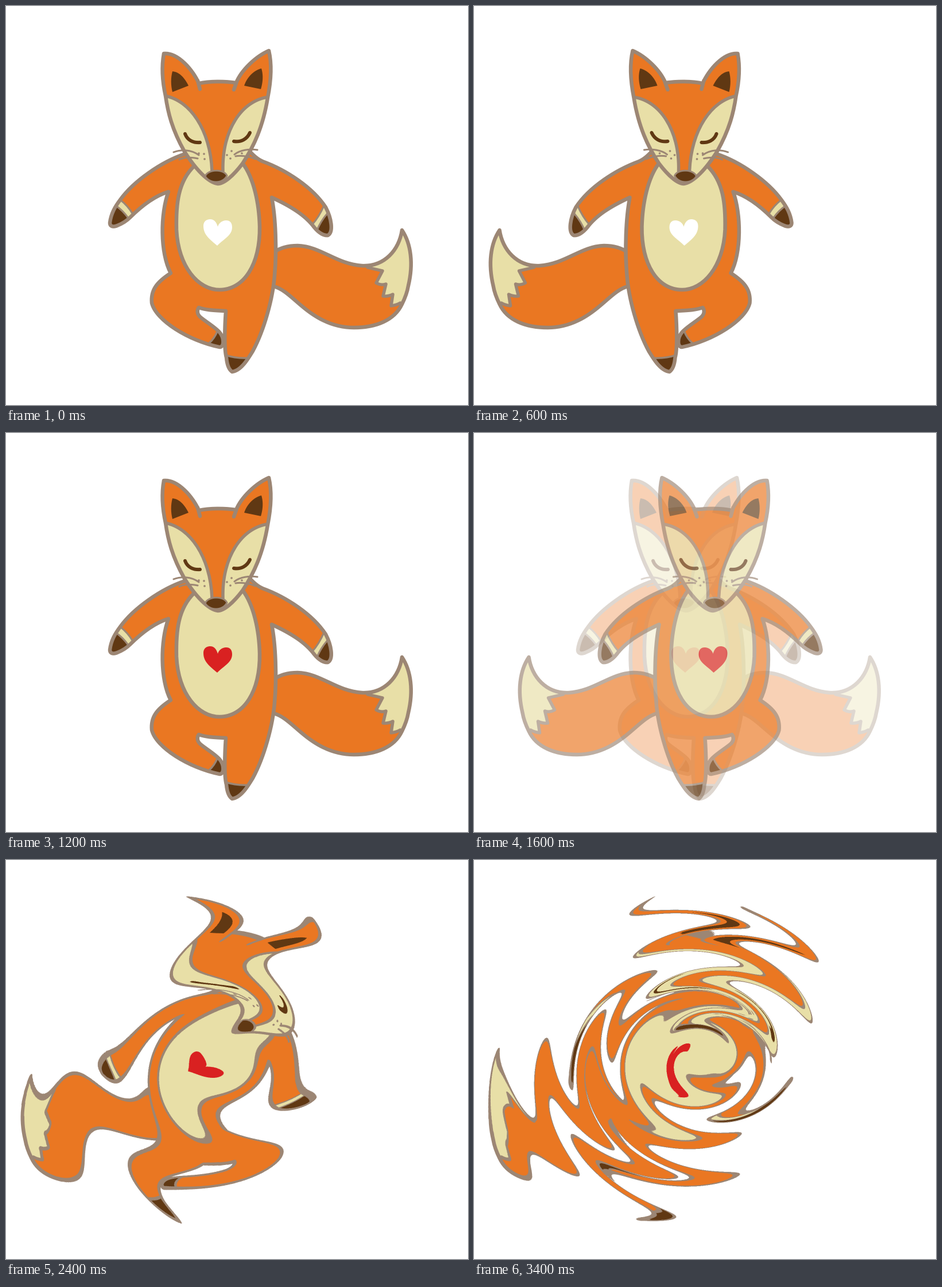
These frames come from a looping animation (805 by 696 pixels, 3.6 s). An HTML page with a canvas:

```html
<!DOCTYPE html>
<html lang="en">
<head>
<meta charset="utf-8">
<title>Dancing fox</title>
<style>
  html, body { margin: 0; width: 100%; height: 100%; overflow: hidden; background: #fff; }
  canvas { display: block; width: 100vw; height: 100vh; }
</style>
</head>
<body>
<canvas id="stage" width="805" height="696"></canvas>
<script>
const W = 805, H = 696, SCALE = 2, STEP = 200, STEPS = 18;
const MIRROR = 734.5;
const ORANGE = '#ea7722', CREAM = '#e8dfa7', BROWN = '#603813',
      LINE = '#9c8674', RED = '#d92121', WHITE = '#fff';

const newCanvas = () => {
  const c = document.createElement('canvas');
  c.width = W * SCALE;
  c.height = H * SCALE;
  return c;
};

function drawFox(g, heart) {
  g.lineCap = g.lineJoin = 'round';
  const shape = (d, fill, stroke, width = 6.5) => {
    const p = new Path2D(d);
    if (fill) { g.fillStyle = fill; g.fill(p); }
    if (stroke) { g.strokeStyle = stroke; g.lineWidth = width; g.stroke(p); }
  };

  // tail
  const tail = 'M466 430C480 420 495 418 508 418C548 419 575 450 620 453C660 455 685 425 690 391' +
    'C706 415 710 450 701 488C699 500 694 512 690 520C677 548 645 561 606 561' +
    'C565 561 535 540 515 523C497 508 483 493 466 489Z';
  const teeth = 'M630 456L656 462L645 483Q654 488 662 485L657 506Q666 507 674 503L671 523Q680 522 687 518';
  shape(tail, ORANGE);
  shape(teeth + 'L690 520C694 512 699 500 701 488C710 450 706 415 690 391C685 425 660 455 628 454Z', CREAM);
  shape(teeth, null, LINE, 5.5);
  shape(tail, null, LINE);

  // body with limbs
  const body = 'M312 258C270 272 222 306 199 338C190 350 183 362 181 378C181 385 187 386 194 383' +
    'C204 379 211 374 216 369C238 347 260 331 283 324C269 362 268 430 287 466' +
    'C262 482 252 496 254 518C261 548 318 584 372 595C380 595 381 580 372 569' +
    'C364 560 350 552 339 543C332 537 333 530 336 526C350 531 366 531 383 532' +
    'C381 560 380 600 384 613C385 625 388 634 394 638C410 636 422 615 430 602' +
    'C450 565 465 510 468 470C472 425 470 370 463 334C498 350 522 366 537 386' +
    'C545 396 554 401 561 400C571 394 567 370 557 351C534 316 488 286 447 271C438 267 432 261 426 255Z';
  shape(body, ORANGE);
  shape('M200 338Q213 348 221 362L212 370Q203 357 191 349Z', CREAM);
  shape('M191 349Q204 357 213 370C202 380 188 385 182 382C182 370 185 358 191 349Z', BROWN);
  shape('M191 348Q204 357 213 370M199 338Q212 348 221 363', null, LINE, 3.2);
  shape('M553 348L559 363Q549 376 543 391L533 382Q546 367 553 348Z', CREAM);
  shape('M559 363C567 375 569 392 561 399C554 400 548 396 542 391Q548 376 559 363Z', BROWN);
  shape('M559 363Q548 376 542 391M554 348Q546 367 533 382', null, LINE, 3.2);
  shape('M368 568Q363 580 354 588Q366 594 374 594C381 588 379 575 368 568Z', BROWN);
  shape('M368 568Q363 580 354 588', null, LINE, 3.5);
  shape('M383 609Q400 615 422 614C415 627 407 636 394 638C387 633 385 622 383 609Z', BROWN);
  shape('M383 609Q400 615 422 614', null, LINE, 3.5);
  shape(body, null, LINE);
  shape('M328 279C300 306 296 345 297 390C300 455 335 495 372 495' +
    'C415 495 443 450 442 385C441 345 432 300 412 274L369 270', CREAM, LINE);
  shape('M368 418C355 407 344 399 344 384C344 375 350 372 356 372C363 372 367 378 369 385' +
    'C371 378 377 374 384 374C390 374 394 378 394 386C394 400 380 406 368 418Z', heart);

  // head
  const head = 'M275 83C300 81 326 112 336 135C355 131 380 131 401 134C410 112 435 88 458 78' +
    'C465 108 460 140 456 160C448 210 432 245 412 275C396 296 380 310 369 310' +
    'C352 308 330 284 311 254C289 215 282 185 278 157C272 130 271 105 275 83Z';
  shape(head, ORANGE);
  shape('M278 157C320 165 356 215 359 288L369 310C352 308 330 284 311 254C289 215 282 185 278 157Z', CREAM);
  shape('M456 159C412 165 376 215 378 288L369 310C380 310 396 296 412 275C432 245 448 210 456 159Z', CREAM);
  shape('M278 157C320 165 356 215 359 288M456 159C412 165 376 215 378 288', null, LINE, 5.5);
  shape(head + 'M334 130L338 145M402 132L397 146', null, LINE);
  shape('M290 114C303 115 312 127 318 139L290 150C287 138 287 125 290 114Z', BROWN);
  shape('M445 109C449 122 447 135 444 145L415 139C420 124 432 112 445 109Z', BROWN);
  shape('M347 297C352 284 380 284 385 296C378 310 356 311 347 297Z', BROWN, LINE, 3);
  shape('M312 223C316 234 326 239 338 238M425 221C420 232 410 238 397 236', null, BROWN, 6);
  shape('M292 255C305 250 322 250 336 260M302 268C312 263 324 264 334 266' +
    'M398 259C408 251 424 249 438 251M400 262C412 260 426 263 434 267', null, LINE, 3);
  const dots = [[336, 257], [345, 258], [346, 267], [393, 253], [385, 260], [391, 266], [411, 257]];
  g.fillStyle = LINE;
  for (const [x, y] of dots) {
    g.beginPath();
    g.arc(x, y, 1.8, 0, 7);
    g.fill();
  }
}

function foxLayer(heart, mirrored) {
  const c = newCanvas(), g = c.getContext('2d');
  g.scale(SCALE, SCALE);
  if (mirrored) { g.translate(MIRROR, 0); g.scale(-1, 1); }
  drawFox(g, heart);
  return c;
}

// Turns every elliptical ring by an angle that rises and falls with the radius.
function ripple(layer, waves, degrees) {
  const c = newCanvas(), g = c.getContext('2d');
  const w = c.width, h = c.height, cx = w / 2, cy = h / 2;
  const from = new Uint32Array(layer.getContext('2d').getImageData(0, 0, w, h).data.buffer);
  const image = g.createImageData(w, h);
  const to = new Uint32Array(image.data.buffer);
  const amount = degrees * Math.PI / 180;
  for (let y = 0; y < h; y++) {
    const v = (y + 0.5 - cy) / cy;
    for (let x = 0; x < w; x++) {
      const u = (x + 0.5 - cx) / cx, r = Math.sqrt(u * u + v * v);
      if (r >= 1) { to[y * w + x] = from[y * w + x]; continue; }
      const wave = Math.sin(waves * Math.PI * r);
      const a = amount * (1 - r) * wave * wave;
      const co = Math.cos(a), si = Math.sin(a);
      const sx = Math.floor(cx + cx * (u * co + v * si));
      const sy = Math.floor(cy + cy * (v * co - u * si));
      to[y * w + x] = from[sy * w + sx];
    }
  }
  g.putImageData(image, 0, 0);
  return c;
}

const plain = [foxLayer(WHITE, false), foxLayer(WHITE, true)];
const loving = [foxLayer(RED, false), foxLayer(RED, true)];
const keys = [...loving, ripple(loving[1], 2, 67), ripple(loving[1], 5, 106)];

const ctx = document.getElementById('stage').getContext('2d');

function put(layer, alpha = 1, dx = 0) {
  ctx.globalAlpha = alpha;
  ctx.drawImage(layer, dx, 0, W, H);
}

function render(step) {
  ctx.globalAlpha = 1;
  ctx.fillStyle = WHITE;
  ctx.fillRect(0, 0, W, H);
  if (step < 6) {
    put((step < 4 ? plain : loving)[step % 2]);
    return;
  }
  const n = Math.min(step - 6, 9), i = Math.floor(n / 3), p = n % 3 / 3;
  put(keys[i], 1 - p);
  if (p) put(keys[i + 1], p, i ? 0 : 153 * (1 - p));
}

let shown = -1;
const start = performance.now();
function tick() {
  const step = Math.floor((performance.now() - start) / STEP) % STEPS;
  if (step !== shown) render(shown = step);
  requestAnimationFrame(tick);
}
tick();
</script>
</body>
</html>
```
